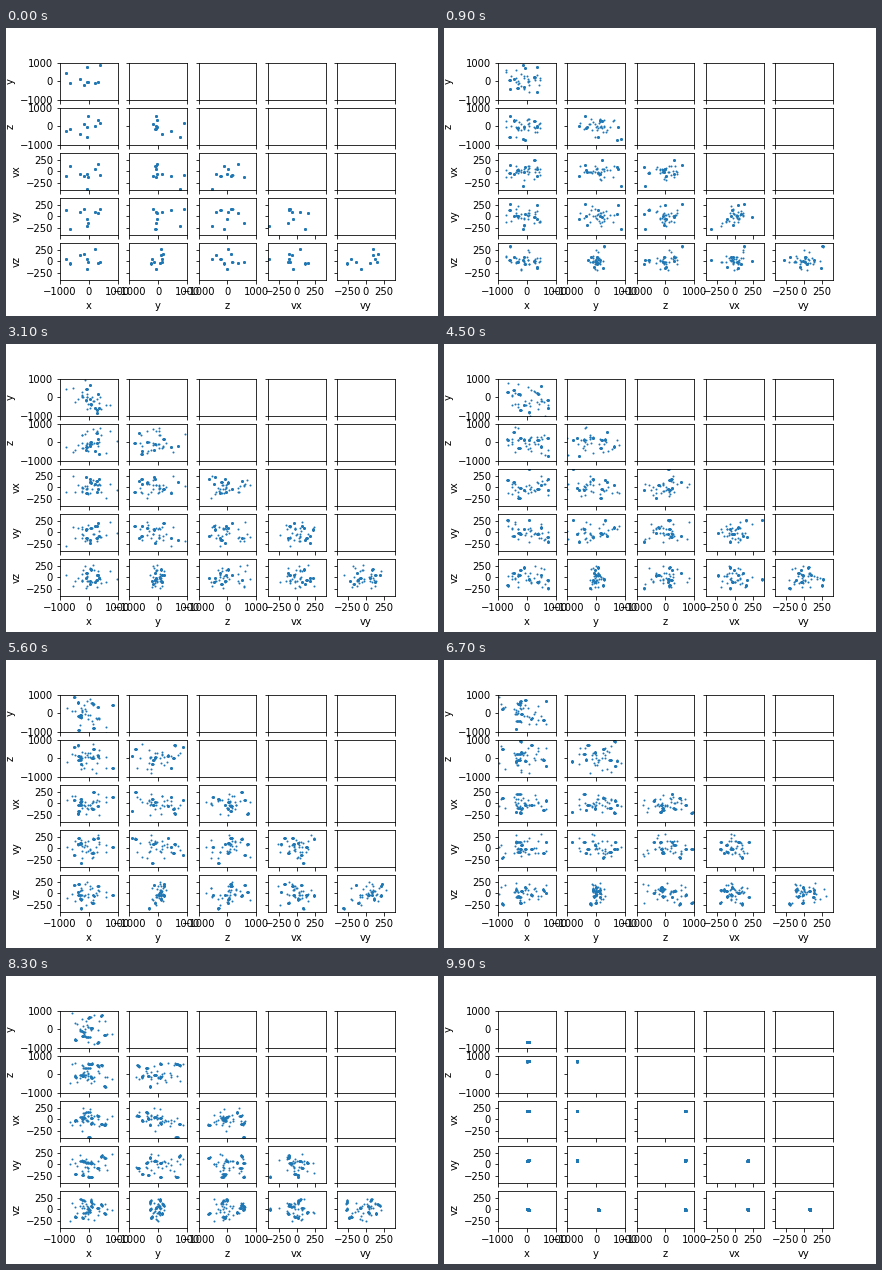
These frames come from a looping animation (432x288 px, 10000 ms). A matplotlib script:

```python
import numpy as np
import matplotlib.pyplot as plt
from matplotlib.animation import FuncAnimation

NAMES = ["x", "y", "z", "vx", "vy", "vz"]
FRAMES, STEP = 100, 100
GROUPS, COPIES, LOOSE = 10, 12, 28
SIZE = np.array([470, 520, 480, 130, 140, 170])
END = np.array([40, -660, 690, 180, 80, -5])
TRAIL = np.array([45, 8, 8, 3, 5, -14])

rng = np.random.default_rng(21)


def drifters(count, size):
    """Sine and cosine amplitudes and rates of freely drifting points."""
    sin, cos = rng.normal(size=(2, count, 6)) * size
    return sin, cos, rng.uniform(.5, 1.3, (count, 6))


def drift(points, t):
    sin, cos, rate = points
    phase = rate * t / 1000
    return sin * np.sin(phase) + cos * np.cos(phase)


groups = drifters(GROUPS, SIZE)
loose = drifters(LOOSE, SIZE * .8)
heading = rng.normal(size=(GROUPS, 6)) * SIZE / SIZE[0]
along = np.linspace(-1, 1, COPIES)[:, None]
parent = np.arange(LOOSE) % GROUPS


def ease(t, start, end):
    u = np.clip((t - start) / (end - start), 0, 1)
    return u * u * (3 - 2 * u)


def state(t):
    t = max(t, STEP)
    gather = ease(t, 8400, 9900)
    centres = drift(groups, t) * (1 - gather) + END * gather
    length = 2 + 33 * (t / 8000) ** 2
    streak = length * heading * (1 - gather) + TRAIL * gather
    tight = centres[:, None] + streak[:, None] * along

    stray = ease(t, STEP, 1300) * (1 - gather)
    free = drift(loose, t)
    free[:, 1] -= .4 * free[:, 0]
    single = centres[parent] * (1 - stray) + free * stray
    return np.vstack([tight.reshape(-1, 6), single])


def scale(k):
    lim, tick = (1000, 1000) if k < 3 else (400, 250)
    return (-lim, lim), (-tick, 0, tick)


fig, axes = plt.subplots(5, 5, figsize=(6, 4), dpi=72)
fig.subplots_adjust(left=.125, right=.9, bottom=.125, top=.88, wspace=.2, hspace=.2)

dots = []
for (row, col), ax in np.ndenumerate(axes):
    if col > row:
        ax.set(xticks=(0, 1), yticks=(0, 1))
    else:
        xlim, xticks = scale(col)
        ylim, yticks = scale(row + 1)
        ax.set(xlim=xlim, xticks=xticks, ylim=ylim, yticks=yticks)
        # the vz panel of the y column shows vy
        a = 4 if (row, col) == (4, 1) else col
        pair = [a, row + 1]
        dots.append((ax.scatter(*state(0)[:, pair].T, s=1, color="C0"), pair))
    ax.tick_params(labelbottom=row == 4, labelleft=col == 0)
    if row == 4:
        ax.set_xlabel(NAMES[col])
    if col == 0:
        ax.set_ylabel(NAMES[row + 1])


def update(n):
    points = state(n * STEP)
    for artist, pair in dots:
        artist.set_offsets(points[:, pair])
    return [artist for artist, _ in dots]


ani = FuncAnimation(fig, update, frames=FRAMES, interval=STEP, repeat=True)
plt.show()
```
